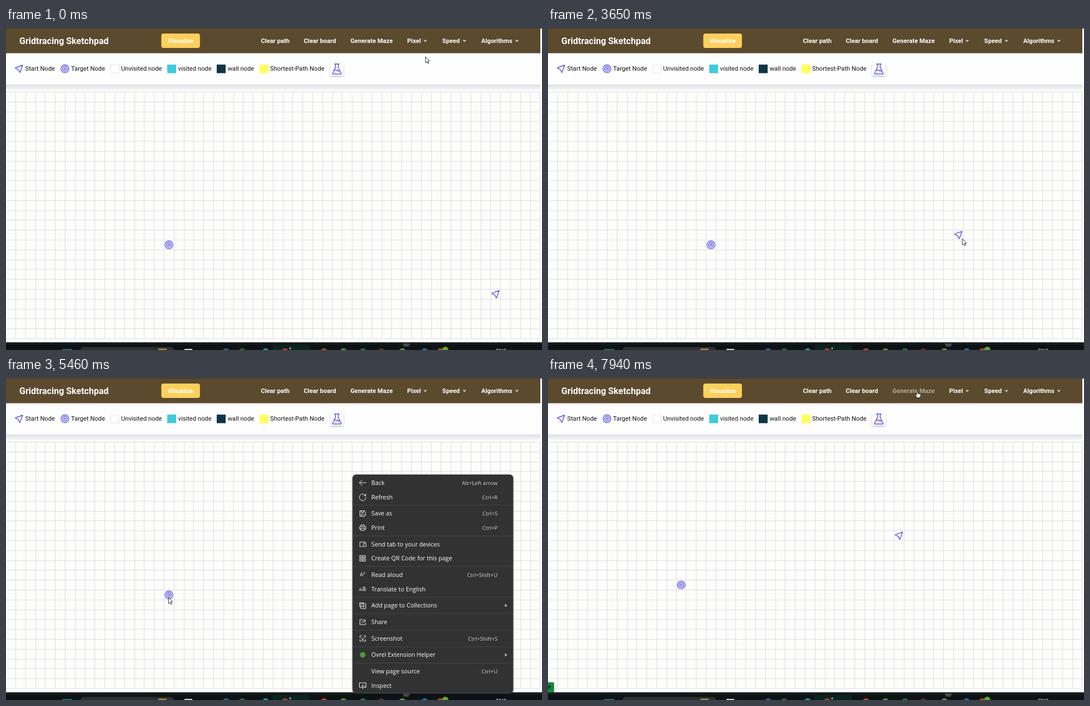
Write an HTML page that moves like this. It is 964x581 px and loops after 8000 ms.

```html
<!DOCTYPE html>
<html lang="en">
<head>
<meta charset="utf-8">
<title>Grid board</title>
<style>
  html, body { margin: 0; width: 100%; height: 100%; overflow: hidden; background: #fdfdfa; }
  svg { display: block; width: 100%; height: 100%; }
  text { font-family: Roboto, Arial, sans-serif; font-size: 11.2px; white-space: pre; }
  .bold { font-weight: 700; fill: #fff; }
  .menu text { font-family: "Open Sans", "Noto Sans", sans-serif; font-size: 10.8px; fill: #fff; }
  .menu .key { font-size: 9.75px; fill: #d2d2d2; text-anchor: end; }
  .menu .glyph { font-family: "Open Sans", "Noto Sans CJK JP", sans-serif; font-size: 9px; text-anchor: middle; }
  .line { fill: none; stroke-linecap: round; stroke-linejoin: round; }
</style>
</head>
<body>
<svg id="stage" viewBox="0 0 964 581">
  <defs>
    <linearGradient id="shade" x2="0" y2="1">
      <stop offset="0" stop-color="#dedee6"/>
      <stop offset=".5" stop-color="#ececf0"/>
      <stop offset="1" stop-color="#fdfdfa"/>
    </linearGradient>
    <filter id="soft" x="-30%" y="-30%" width="160%" height="170%">
      <feDropShadow dx="0" dy="1.5" stdDeviation="1.6" flood-color="#000" flood-opacity=".28"/>
    </filter>
    <g id="plane" class="line" stroke="#5a55e4">
      <path stroke-width="2" transform="scale(.72) translate(-12 -12)"
        d="M21 3l-6.5 18a.55.55 0 0 1-1 0L10 14l-7-3.500a.55.55 0 0 1 0-1L21 3"/>
    </g>
    <g id="rings" class="line" stroke="#5a55e4" stroke-width="1.4">
      <circle r="7"/><circle r="4.200"/><circle r="1.400"/>
    </g>
  </defs>
  <rect width="964" height="581" fill="#fdfdfa"/>
  <g id="page"></g>
  <use id="goal" href="#rings"/>
  <use id="start" href="#plane"/>
  <g id="taskbar"></g>
  <g id="status">
    <path d="M0 549h8q3 0 3 3v15H0z" fill="#138a3c"/>
    <text x="-.5" y="561" font-size="9" style="font-size:9px">#</text>
  </g>
  <g id="menu" class="menu"></g>
  <path id="arrow" d="M0 0V11L2.500 8.700 4.200 12.400 5.900 11.600 4.300 8H7.400z"
    fill="#fff" stroke="#222" stroke-width=".9" stroke-linejoin="round"/>
  <path id="hand" d="M-1 1Q0-.5 1 1V5L5.200 5.800Q6.500 6.200 6.300 7.600L5.600 12.500H-.2L-3.300 8.300Q-3.400 6.800-2.200 7.200L-1 8.300z"
    fill="#fff" stroke="#222" stroke-width=".9" stroke-linejoin="round"/>
</svg>
<script>
const $ = id => document.getElementById(id);
const LOOP = 8000;
const CELL = 17.8, LEFT = -0.8, TOP = 114.9, COLS = 54, ROWS = 25;

const rect = (x, y, w, h, fill, more = '') =>
  `<rect x="${x}" y="${y}" width="${w}" height="${h}" fill="${fill}" ${more}/>`;
const text = (x, y, s, more = '') => `<text x="${x}" y="${y}" ${more}>${s}</text>`;
const dot = (x, y, r, fill) => `<circle cx="${x}" cy="${y}" r="${r}" fill="${fill}"/>`;

function header() {
  const links = [[458.5, 'Clear path'], [535.5, 'Clear board'], [619.5, 'Generate Maze'],
    [721.5, 'Pixel'], [784.5, 'Speed'], [854.8, 'Algorithms']];
  const carets = [754, 824.5, 918.8];
  return rect(0, 0, 961, 45.5, '#5b4a2e') + rect(0, 0, 964, 1, '#453a32') +
    text(24, 28.7, 'Gridtracing Sketchpad', 'class="bold" style="font-size:16px"') +
    rect(279.3, 10, 69.5, 26, '#fdd05c', 'rx="4"') +
    text(314, 27.3, 'Visualize', 'class="bold" text-anchor="middle"') +
    links.map(([x, s]) => text(x, 27.4, s, `class="bold"${s === 'Generate Maze' ? ' id="maze"' : ''}`)).join('') +
    carets.map(x => `<path d="M${x - 3.4} 21.800h6.800l-3.400 3.700z" fill="#cbc5c4"/>`).join('');
}

function legend() {
  const labels = [[34.5, 'Start Node'], [117, 'Target Node'], [207, 'Unvisited node'],
    [309.5, 'visited node'], [398.7, 'wall node'], [475, 'Shortest-Path Node']];
  const swatches = [[290, '#40cbdc'], [379, '#0c3547'], [456, '#ffff61']];
  return rect(0, 102, 961, 11, 'url(#shade)') + rect(0, 45.5, 961, 56.5, '#fefefe') +
    '<use href="#plane" x="23.500" y="73.500"/><use href="#rings" x="106" y="73.500"/>' +
    rect(188.5, 66.5, 15, 14.5, '#fff', 'stroke="#e4e4f2"') +
    swatches.map(([x, c]) => rect(x, 66, 16, 15.5, c)).join('') +
    labels.map(([x, s]) => text(x, 77.3, s, 'fill="#111"')).join('') +
    rect(583, 62, 24, 24, '#fff', 'rx="3" filter="url(#soft)"') +
    `<g class="line" stroke="#5a55e4" stroke-width="1.500">
      <path d="M590.500 65h9M592.500 65v6.500L587.500 81q-.8 2 1.200 2h12.600q2 0 1.200-2L597.500 71.500V65M590 76.500q2.500-1.500 5 0t5 0"/>
      <path d="M593 80h.1M597.500 79.500h.1"/></g>`;
}

function grid() {
  const right = Math.round(LEFT + COLS * CELL), bottom = Math.round(TOP + ROWS * CELL);
  let d = '';
  for (let c = 1; c <= COLS; c++) d += `M${Math.round(LEFT + c * CELL) + .5} 115V${bottom}`;
  for (let r = 0; r <= ROWS; r++) d += `M0 ${Math.round(TOP + r * CELL) + .5}H${right}`;
  return `<path d="${d}" stroke="#dddded" stroke-width="1.100" fill="none"/>`;
}

function taskbar() {
  const icons = [[396, '#2b63a8'], [425, '#27702c'], [467, '#1fa39b'], [502, '#c23a2c'], [572, '#c8452f'],
    [607, '#4f9e3a'], [642, '#1f7a36'], [675, '#6b2b22'], [713, '#5d9c2f'], [753, '#1f78b8'], [781, '#c9452f']];
  return rect(0, 567, 964, 14, '#0d1314') + rect(0, 567, 964, 1, '#34383a') + rect(0, 569, 964, 1.5, '#1d2325') +
    rect(480, 572, 66, 9, '#0b2420') +
    '<path d="M713 569h14l-3 6h-8z" fill="#45484a"/>' +
    rect(134, 575.5, 168, 14, '#2d3032', 'rx="6"') +
    rect(101, 579.5, 18, 3, '#238a8c') + rect(274, 578.5, 15, 3, '#a48a3a') + rect(321, 579, 14, 3, '#d8d8d8') +
    icons.map(([x, c]) => dot(x, 584.5, 6.5, c)).join('') +
    dot(511, 578, 1.5, '#c9c9c9') + dot(790, 580.5, 5.5, '#62a832') +
    text(881.5, 586, 'ENG', 'fill="#fff" style="font-size:9.500px"');
}

// Icon paths are centred on 0,0.
const ICON = {
  back: 'M6 0H-6M-1-5L-6 0L-1 5',
  refresh: 'M5-3A6 6 0 1 0 6 0M5.500-5.500V-2.500H2.500',
  save: 'M0 5H-5V-5H3L5-3V0M-2.500-5V-2H2V-5M-2.500 5V1H1M1 5L5 1L6 2L2 6z',
  print: 'M-3-2V-5H3V-2M-3 3H-5.500V-2H5.500V3H3M-3 1H3V5H-3z',
  send: 'M-5 2V-4H5M-6 4H0M2-2H6V4H2z',
  code: 'M-5-5H-1V-1H-5zM1-5H5V-1H1zM-5 1H-1V5H-5zM1 1H5V5H1zM-3-3h.1M3-3h.1M-3 3h.1M3 3h.1',
  add: 'M-3 3L-5.500 2V-5H2V-3M-3-3H5.500V5.500H-3zM1.200-1V3.500M-1 1.200H3.500',
  share: 'M0-4H-5V5H5V2M-2 2Q-1-2 5-2M2-5L5.500-2L2 1',
  shot: 'M-5-2V-5H-2M2-5H5V-2M-5 2V5H-3M5 2V5H3M-3-2L2 5M3-2L-2 5',
  inspect: 'M-1 3H-6V-5H6V3H5M0-1L5 3H2L0 5.500z'
};

function menu() {
  const rows = [[189, 'Back', 'Alt+Left arrow', 'back'], [215, 'Refresh', 'Ctrl+R', 'refresh'],
    [244.5, 'Save as', 'Ctrl+S', 'save'], [270, 'Print', 'Ctrl+P', 'print'],
    [300, 'Send tab to your devices', '', 'send'], [325.5, 'Create QR Code for this page', '', 'code'],
    [355, 'Read aloud', 'Ctrl+Shift+U', 'A⁾⁾'], [381, 'Translate to English', '', 'aあ'],
    [410.5, 'Add page to Collections', '>', 'add'], [440, 'Share', '', 'share'],
    [470, 'Screenshot', 'Ctrl+Shift+S', 'shot'], [499.5, 'Ovrel Extension Helper', '>', ''],
    [529.5, 'View page source', 'Ctrl+U', ''], [555, 'Inspect', '', 'inspect']];
  const rules = [229.5, 285, 340, 395.5, 425, 455, 485, 514.5];
  const icon = (name, y) => ICON[name]
    ? `<path class="line" stroke="#f0f0f0" transform="translate(641.500 ${y})" d="${ICON[name]}"/>`
    : text(641.5, y + 3.2, name, 'class="glyph"');
  const hint = (s, y) => s === '>'
    ? `<path d="M897.500 ${y - 3}l4 3l-4 3z" fill="#c4c4c4"/>`
    : text(884, y + 3.8, s, 'class="key"');
  return rect(623.5, 174.5, 288.5, 394, '#323333', 'rx="6" stroke="#484848" filter="url(#soft)"') +
    rules.map(y => rect(624, y - .5, 287.5, 1, '#454646')).join('') +
    rows.map(([y, s, key, name]) => text(657, y + 3.9, s) + hint(key, y) + icon(name, y)).join('') +
    dot(641.5, 499.5, 5, '#4c9a3a');
}

// Pointer stops: time, x, y.
const STOPS = [
  [40, 754.5, 51.8], [210, 730, 31], [820, 730, 31], [1690, 769, 255],
  [1910, 769, 255], [2700, 872, 480.5], [3020, 872, 480.5], [4260, 625, 285.5],
  [4560, 625, 285.5], [5400, 292.3, 396], [5560, 292.3, 396], [6100, 239.5, 377],
  [6150, 239.5, 377], [6270, 309, 301], [6680, 309, 301], [6720, 315.8, 294],
  [6980, 405, 205], [7160, 405, 205], [7920, 664, 23]
];

function pointer(t) {
  const i = STOPS.findIndex(s => s[0] > t);
  if (i === 0) return STOPS[0].slice(1);
  if (i < 0) return STOPS[STOPS.length - 1].slice(1);
  const [t0, x0, y0] = STOPS[i - 1], [t1, x1, y1] = STOPS[i];
  const u = (t - t0) / (t1 - t0), k = u * u * (3 - 2 * u);
  return [x0 + (x1 - x0) * k, y0 + (y1 - y0) * k];
}

// A dragged node sits in the cell under the pointer.
function drag(id, t, from, to) {
  const [x, y] = pointer(Math.min(Math.max(t, from), to));
  const mid = (v, origin) => origin + (Math.floor((v - origin) / CELL) + .5) * CELL;
  place(id, mid(x, LEFT) + .2, mid(y, TOP) + .4);
}

const place = (id, x, y) => $(id).setAttribute('transform', `translate(${x.toFixed(2)} ${y.toFixed(2)})`);
const show = (id, on) => $(id).setAttribute('visibility', on ? 'visible' : 'hidden');

function draw(t) {
  const [x, y] = pointer(t);
  const hover = x > 619 && x < 697 && y < 33 && t > 7000;
  drag('start', t, 3020, 4260);
  drag('goal', t, 5560, 6100);
  place('arrow', x, y);
  place('hand', x, y);
  show('arrow', !hover);
  show('hand', hover);
  show('status', hover);
  show('menu', t >= 4490 && t < 5540);
  $('maze').style.fill = hover ? '#b3ab90' : '#fff';
}

$('page').innerHTML = legend() + header() + grid();
$('taskbar').innerHTML = taskbar();
$('menu').innerHTML = menu();

const begin = performance.now();
function tick() {
  draw((performance.now() - begin) % LOOP);
  requestAnimationFrame(tick);
}
tick();
</script>
</body>
</html>
```
